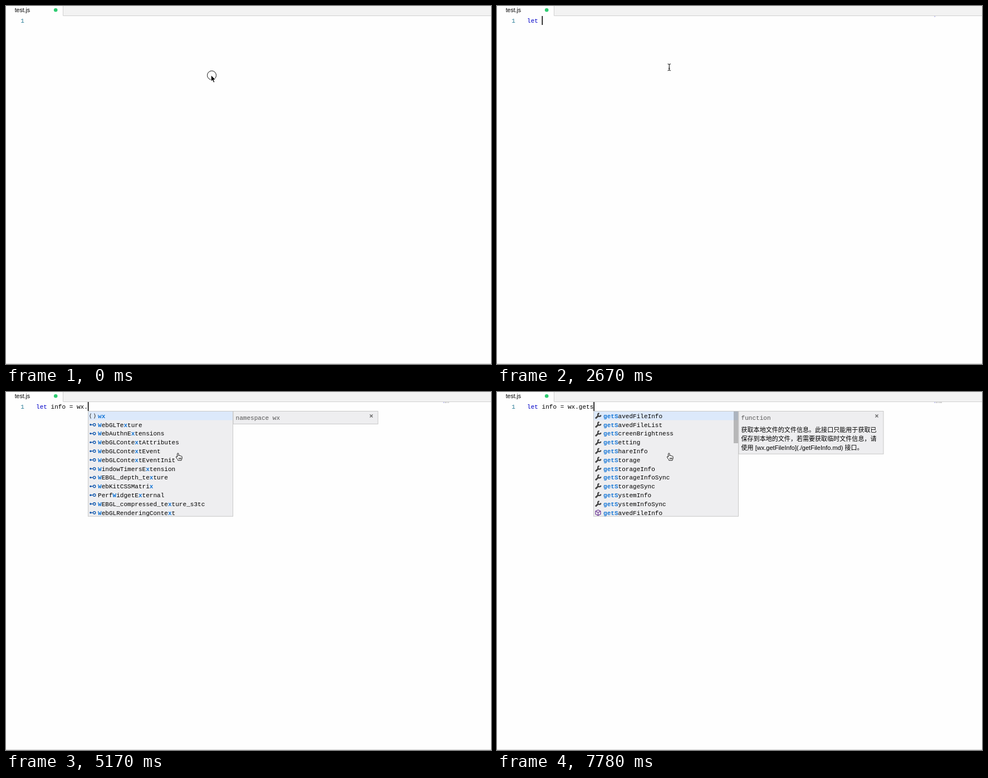
Recreate the animation shown at these times as an HTML page. Size 871 px wide and 643 px high, loop 8000 ms.

```html
<!DOCTYPE html>
<html lang="zh-CN">
<head>
<meta charset="utf-8">
<title>test.js</title>
<style>
html, body { margin: 0; width: 100%; height: 100%; overflow: hidden; background: #fefefe; }
svg { display: block; }
text { white-space: pre; }
.code { font: 11.05px "Liberation Mono", monospace; }
.hit { font-weight: bold; fill: #1576d6; }
.doc { font: 11.05px "Liberation Sans", "Noto Sans CJK SC", "Noto Sans CJK", sans-serif; }
.tab { font: 10.5px "Liberation Sans", sans-serif; }
</style>
</head>
<body>
<svg width="871" height="643" viewBox="0 0 871 643">
  <rect width="871" height="643" fill="#fefefe"/>
  <rect x="102" width="769" height="17" fill="#f3f3f3"/>
  <path d="M102.5 0V17.5H871M0 642.5H871" fill="none" stroke="#d0d0d0"/>
  <text class="tab" x="15.7" y="11">test.js</text>
  <circle cx="89.2" cy="7.3" r="3.3" fill="#2ecc71"/>
  <text class="code" x="26.2" y="30" fill="#237893">1</text>
  <g id="editor"></g>
  <g id="popup"></g>
  <g id="mouse"></g>
</svg>
<script>
const LOOP = 8000, LEFT = 54, CHAR = 6.632, ROW = 15.8;
const $ = id => document.getElementById(id);

// Each item: icon letter (m method, v variable, k keyword, i interface, n namespace, c cube) and label.
const lists = {
  l: {
    items: 'm:login v:length k:let v:localStorage v:location v:locationbar i:LinkStyle m:ListeningState i:ListeningStateChangedEvent i:Location i:LongRange i:LongRunningScriptDetectedEvent',
    doc: ['function', '调用接口获取**登录凭证（code）**进而换取用户', '登录态信息，包括用户的**唯一标识（openid）**',
      '及本次登录的 **会话密钥（session_key）**。**', '用户数据的加解密通讯**需要依赖会话密钥完成。']
  },
  le: { items: 'k:let v:length m:alert m:clearTimeout m:clearInterval m:releaseEvents m:ListeningState i:ListeningStateChangedEvent i:LongRunningScriptDetectedEvent i:FileList i:StyleSheet i:HTMLElement' },
  i: { items: 'k:if k:import k:in v:indexedDB v:innerHeight v:innerWidth k:instanceof k:interface m:isFinite m:isNaN v:isSecureContext i:ImageData' },
  in: { items: 'k:in v:indexedDB v:innerHeight v:innerWidth k:instanceof k:interface i:InputEvent i:Int8Array i:Int16Array i:Int32Array i:IntersectionObserver v:Infinity' },
  info: {
    items: 'v:clientInformation i:WebGLActiveInfo m:getFileInfo m:getImageInfo m:getUserInfo m:getSystemInfo m:getStorageInfo m:getShareInfo m:getSavedFileInfo',
    doc: ['var clientInformation: Navigator']
  },
  w: {
    items: 'n:wx k:while v:window k:with i:WaveShaperNode i:WebAuthentication i:WebGLBuffer i:WebGLContextEvent i:WebGLProgram i:WebGLTexture i:WebSocket i:WheelEvent',
    doc: ['namespace wx']
  },
  wx: {
    items: 'n:wx i:WebGLTexture i:WebAuthnExtensions i:WebGLContextAttributes i:WebGLContextEvent i:WebGLContextEventInit i:WindowTimersExtension i:WEBGL_depth_texture i:WebKitCSSMatrix i:PerfWidgetExternal i:WEBGL_compressed_texture_s3tc i:WebGLRenderingContext',
    doc: ['namespace wx']
  },
  all: {
    items: 'm:addCard m:addPhoneContact m:arrayBufferToBase64 m:authorize m:base64ToArrayBuffer m:canIUse m:canvasToTempFilePath m:checkIsSupportSoterAuthentication m:checkSession m:chooseAddress m:chooseContact m:chooseImage',
    doc: ['function', '批量添加卡券。'], thumb: 15
  },
  get: {
    items: 'm:getBackgroundAudioManager m:getBackgroundAudioPlayerState m:getBeacons m:getBLEDeviceCharacteristics m:getBLEDeviceServices m:getBluetoothAdapterState m:getBluetoothDevices m:getClipboardData m:getConnectedBluetoothDevices m:getExtConfig m:getExtConfigSync m:getFileInfo',
    doc: ['function', '获取全局唯一的背景音频管理器。'], thumb: 38
  },
  gets: {
    items: 'm:getSavedFileInfo m:getSavedFileList m:getScreenBrightness m:getSetting m:getShareInfo m:getStorage m:getStorageInfo m:getStorageInfoSync m:getStorageSync m:getSystemInfo m:getSystemInfoSync c:getSavedFileInfo',
    doc: ['function', '获取本地文件的文件信息。此接口只能用于获取已', '保存到本地的文件，若需要获取临时文件信息，请', '使用 [wx.getFileInfo](./getFileInfo.md) 接口。'], thumb: 56
  }
};

// [time, typed text, list, matched letters]
const steps = [
  [0, ''], [2120, 'l'], [2180, 'l', 'l', 'l'], [2230, 'le', 'l', 'l'], [2300, 'le', 'le', 'le'],
  [2400, 'let', 'le', 'le'], [2470, 'let', 'le', 'let'], [2620, 'let ', 'le', 'let'], [2670, 'let '],
  [2850, 'let i'], [2910, 'let i', 'i', 'i'], [2980, 'let in', 'i', 'i'], [3040, 'let in', 'in', 'in'],
  [3110, 'let inf', 'in', 'in'], [3170, 'let inf', 'info', 'inf'], [3240, 'let info', 'info', 'info'],
  [3630, 'let info ', 'info', 'info'], [3680, 'let info '], [4010, 'let info ='], [4250, 'let info = '],
  [4550, 'let info = w'], [4610, 'let info = w', 'w', 'w'], [4720, 'let info = wx', 'w', 'w'],
  [4780, 'let info = wx', 'wx', 'wx'], [5170, 'let info = wx.', 'wx', 'wx'], [5230, 'let info = wx.'],
  [5310, 'let info = wx.', 'all', ''], [6650, 'let info = wx.g', 'all', ''], [6710, 'let info = wx.g', 'get', 'g'],
  [6800, 'let info = wx.ge', 'get', 'ge'], [7210, 'let info = wx.get', 'get', 'get'],
  [7670, 'let info = wx.gets', 'get', 'get'], [7780, 'let info = wx.gets', 'gets', 'gets']
];
const caretFlips = [[0, 0], [780, 1], [1280, 0], [1760, 1], [5670, 0], [6130, 1]];
const thumbFade = [[0, 1], [5900, .7], [6130, .35], [6360, .08], [6710, 1], [7440, .6], [7780, 1]];

const at = (track, t) => track.findLast(k => k[0] <= t);
const label = (x, y, cls, body, fill = '#000') => `<text class="${cls}" x="${x}" y="${y}" fill="${fill}">${body}</text>`;
const box = (x, y, w, h, fill, extra = '') => `<rect x="${x}" y="${y}" width="${w}" height="${h}" fill="${fill}" ${extra}/>`;
const line = (d, color, width = 1, fill = 'none') => `<path d="${d}" fill="${fill}" stroke="${color}" stroke-width="${width}"/>`;

const icons = {
  m: line('M-4.6 4.6L.6 -.4', '#424242', 2.8) + line('M2.1 -4.6A2.7 2.7 0 1 0 5 -1.5', '#424242', 2.2),
  v: line('M-3.5 -3.5H-5V3.5H-3.5M3.5 -3.5H5V3.5H3.5', '#424242') + '<ellipse rx="2.8" ry="2.3" fill="#1459ad"/><path d="M-1.5 -.6L0 .1L1.5 -.6" stroke="#dbe6f5" stroke-width=".6" fill="none"/>',
  k: line('M-5.5 -4H-1M1 -4H5M-5.5 -1.3H2M3.5 -1.3H5M-5.5 1.3H-2M0 1.3H5M-5.5 4H1M3 4H5', '#555'),
  i: line('M-4 0H1', '#1459ad', 1.2) + '<circle cx="-3.6" r="1.7" fill="#1459ad"/><circle cx="3.1" r="2.2" fill="none" stroke="#1459ad" stroke-width="1.4"/>',
  n: line('M-2.5 -4.3C-5 -4.3 -3 -.4 -5.2 0C-3 .4 -5 4.3 -2.5 4.3M2.5 -4.3C5 -4.3 3 -.4 5.2 0C3 .4 5 4.3 2.5 4.3', '#424242', 1.1),
  c: line('M0 -5L4.5 -2.7V2.7L0 5L-4.5 2.7V-2.7ZM-4.5 -2.7L0 -.3L4.5 -2.7M0 -.3V5', '#652d90', 1.1)
};

const pointers = {
  arrow: line('M-.8 -.5V11.2L1.8 8.8L3.7 13L5.8 12.1L4 8H7.6Z', '#fff', 1, '#000'),
  beam: line('M-2.5 -6Q0 -6 .3 -4.5Q.6 -6 3.1 -6M.3 -4.7V4.7M-2.5 6Q0 6 .3 4.5Q.6 6 3.1 6M-1.2 2H1.8', '#111', 1.1),
  hand: line('M-1.4 7V1.2C-1.4 -.6 1 -.6 1 1.2V4.6C1.2 3.5 3.1 3.6 3.1 5C3.4 4.1 5.1 4.2 5.2 5.5C5.6 4.8 7.1 5 7.1 6.6V9C7.1 10.6 6 11 6 12.8H-.2C-.3 11 -2 9.7 -3.3 7.6C-4.3 6 -2.6 5.2 -1.4 7ZM1.6 8V10.6M3.4 8V10.6M5 8V10.6', '#111', 1, '#fff')
};

// Marks the query letters, taken in order, inside a name.
function mark(name, query) {
  let n = 0;
  return [...name].map(c => {
    const hit = n < query.length && c.toLowerCase() === query[n];
    if (hit) n++;
    return hit ? `<tspan class="hit">${c}</tspan>` : c;
  }).join('');
}

function editor(text, caret, squiggle) {
  const body = text.startsWith('let') ? `<tspan fill="#0000c8">let</tspan>${text.slice(3)}` : text;
  let out = label(LEFT, 30, 'code', body);
  [...text].forEach((c, n) => {
    if (c === ' ') return;
    const ink = n < 3 && text.length > 2 ? '#2020c0' : '#333';
    out += box(785 + n * .78, 18.4, .78, 1.1, ink, `opacity="${c === '.' ? .2 : .4}"`);
  });
  if (squiggle) out += line('M140 33.2L141.8 31.4L143.6 33.2L145.4 31.4L147 33', '#e51400');
  if (caret) out += box(LEFT + text.length * CHAR, 18, 1.6, 16, '#000');
  return out;
}

function popup(list, query, x, fade) {
  const rows = list.items.split(' '), frame = 'stroke="#c8c8c8"';
  let out = box(x + .5, 34.5, 260, rows.length * ROW - .8, '#eeeef0', frame);
  out += box(x + 1, 35, 259, 15.6, '#dce9fb');
  rows.forEach((row, n) => {
    const [kind, name] = row.split(':'), y = 43 + n * ROW;
    out += `<g transform="translate(${x + 8.5} ${y})">${icons[kind]}</g>` + label(x + 18, y + 3.7, 'code', mark(name, query));
  });
  if (list.thumb) out += box(x + 252, 35, 8, list.thumb + 1, '#646464', `opacity="${.4 * fade}"`);
  if (!list.doc) return out;
  const [head, ...lines] = list.doc;
  out += box(x + 261, 34.5, 260, lines.length ? 29.4 + lines.length * ROW : 23, '#eeeef0', frame);
  out += label(x + 265.5, 50, 'code', head, '#555');
  lines.forEach((s, n) => out += label(x + 265.5, 72 + n * ROW, 'doc', s));
  return out + line(`M${x + 506.5} 40.5l5 5m0 -5l-5 5`, '#666', 1.4);
}

function mouse(t, open) {
  const p = Math.min(1, Math.max(0, Math.floor((t - 530) / 62.5 + 1) / 13));
  const e = p * p * (3 - 2 * p);
  const kind = open ? 'hand' : t < 530 ? 'arrow' : 'beam';
  const ring = t < 30 ? '<circle cx=".5" r="8" fill="none" stroke="#111"/>' : '';
  return `<g transform="translate(${369 - 60 * e} ${124.5 - 14.5 * e})">${ring}${pointers[kind]}</g>`;
}

const shown = {};
function put(id, html) {
  if (shown[id] !== html) $(id).innerHTML = shown[id] = html;
}

function draw(t) {
  const [, text, name, query] = at(steps, t);
  put('editor', editor(text, at(caretFlips, t)[1], t >= 5670 && t < 7670));
  put('popup', name ? popup(lists[name], query, Math.floor(LEFT + text.length * CHAR + .2), at(thumbFade, t)[1]) : '');
  put('mouse', mouse(t, !!name));
}

let start;
function tick(now) {
  start ??= now;
  draw((now - start) % LOOP);
  requestAnimationFrame(tick);
}
draw(0);
requestAnimationFrame(tick);
</script>
</body>
</html>
```
